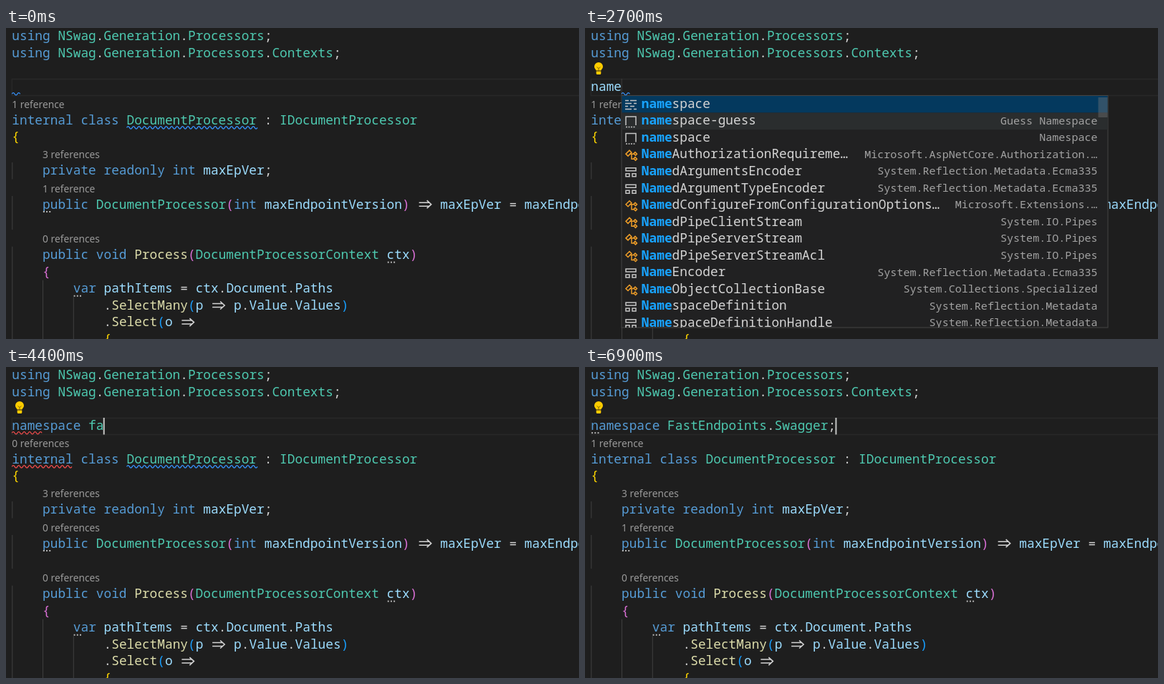
Write an HTML page that moves like this. It is 800x435 px and loops after 7.1 s.

```html
<!DOCTYPE html>
<html lang="en">
<head>
<meta charset="utf-8">
<title>Namespace completion</title>
<style>
  html, body { margin: 0; width: 100%; height: 100%; overflow: hidden; background: #1e1e1e; }
  svg { display: block; width: 800px; height: 435px; }
  text { white-space: pre; font: 500 17.81px "Noto Sans Mono", "DejaVu Sans Mono", monospace; fill: #d4d4d4; font-variant-ligatures: none; }
  .lens { font: 13.8px "Noto Sans", "Open Sans", sans-serif; fill: #999; }
  .detail { font-size: 15.07px; fill: #a3a3a3; text-anchor: end; }
  .match { font-weight: bold; fill: #18a3ff; }
</style>
</head>
<body>
<svg id="stage" viewBox="0 0 800 435"></svg>
<script>
const LOOP = 7100, LEFT = 8.3, CHAR = 10.686, ROW = 23.55;
const colors = {
  k: '#569cd6', t: '#4ec9b0', v: '#9cdcfe', m: '#dcdcaa', p: '#d4d4d4',
  gold: '#ffd700', orchid: '#da70d6', blue: '#179fff'
};
const stage = document.getElementById('stage');
const colX = col => LEFT + col * CHAR;
const baseline = row => 17 + row * ROW;

function add(tag, attrs = {}, parent = stage, content = '') {
  const node = document.createElementNS('http://www.w3.org/2000/svg', tag);
  for (const name in attrs) node.setAttribute(name, attrs[name]);
  node.textContent = content;
  return parent.appendChild(node);
}
const show = (node, on) => { node.style.display = on ? '' : 'none'; };

// Fills a text node from alternating colour keys and strings; punctuation stays plain.
function fillTokens(node, tokens) {
  node.textContent = '';
  for (let i = 0; i < tokens.length; i += 2)
    for (const part of tokens[i + 1].split(/([.;:=])/))
      if (part) add('tspan', { fill: colors[/^[.;:=]$/.test(part) ? 'p' : tokens[i]] }, node, part);
}
function code(row, col, ...tokens) {
  const node = add('text', { x: colX(col), y: baseline(row) });
  fillTokens(node, tokens);
  return node;
}
const lens = (row, col, label) =>
  add('text', { class: 'lens', x: colX(col), y: baseline(row) + .6 }, stage, label);

function arrow(row, col) {
  const x = colX(col), y = baseline(row) - 5.8;
  add('path', {
    d: `M${x + 2} ${y - 2.5}h14M${x + 2} ${y + 2.5}h14M${x + 13} ${y - 5.5}l6 5.5l-6 5.5`,
    fill: 'none', stroke: colors.p, 'stroke-width': 1.6
  });
}
function guide(col, fromRow, toRow) {
  const y = baseline(fromRow) - 17.5;
  add('rect', { x: colX(col), y, width: 1, height: (toRow - fromRow + 1) * ROW, fill: '#404040' });
}
function wave(row, col, chars, color) {
  const x = colX(col), y = baseline(row) + 4.6, half = 3.8;
  const turns = Math.round(chars * CHAR / half);
  let d = `M${x} ${y}q${half / 2} -3.4 ${half} 0`;
  for (let i = 1; i < turns; i++) d += `t${half} 0`;
  return add('path', { d, fill: 'none', stroke: color, 'stroke-width': 1.3 });
}
function dots(row, col) {
  const g = add('g', { fill: '#b5b5b5' });
  for (let i = 0; i < 3; i++)
    add('rect', { x: colX(col) + .8 + i * 4.2, y: baseline(row) + 3.5, width: 2, height: 2 }, g);
  return g;
}

add('rect', { width: 800, height: 435, fill: '#1e1e1e' });
add('rect', { x: LEFT, y: 71.5, width: 800, height: 23, fill: 'none', stroke: '#282828', 'stroke-width': 1.5 });

guide(0, 8, 8); guide(0, 10, 11); guide(0, 13, 18);
guide(4, 15, 18); guide(8, 16, 18);

code(0, 0, 'k', 'using ', 't', 'NSwag.Generation.Processors;');
code(1, 0, 'k', 'using ', 't', 'NSwag.Generation.Processors.Contexts;');
const typed = code(3, 0);
const classLens = lens(4, 0, '');
code(5, 0, 'k', 'internal class ', 't', 'DocumentProcessor : IDocumentProcessor');
code(6, 0, 'gold', '{');
lens(7, 4, '3 references');
code(8, 4, 'k', 'private readonly int ', 'v', 'maxEpVer;');
const ctorLens = lens(9, 4, '');
code(10, 4, 'k', 'public ', 't', 'DocumentProcessor', 'orchid', '(', 'k', 'int ',
  'v', 'maxEndpointVersion', 'orchid', ')', 'v', '    maxEpVer = maxEndpointVersion;');
arrow(10, 53);
lens(12, 4, '0 references');
code(13, 4, 'k', 'public void ', 'm', 'Process', 'orchid', '(', 't', 'DocumentProcessorContext ',
  'v', 'ctx', 'orchid', ')');
code(14, 4, 'orchid', '{');
code(15, 8, 'k', 'var ', 'v', 'pathItems = ctx.Document.Paths');
code(16, 12, 'm', '.SelectMany', 'blue', '(', 'v', 'p    p.Value.Values', 'blue', ')');
arrow(16, 26);
code(17, 12, 'm', '.Select', 'blue', '(', 'v', 'o');
arrow(17, 22);
code(18, 12, 'gold', '{');

dots(10, 4); dots(13, 49); dots(15, 8);
const nameDots = dots(3, 10), keywordDots = dots(3, 0);
const classWave = wave(5, 15, 17, '#3794ff');
const endWave = wave(3, 0, 1, '#3794ff');
const errorWaves = [wave(3, 0, 4, '#f14c4c'), wave(5, 0, 8, '#f14c4c')];
const missingWave = wave(3, 31, 1, '#f14c4c');

const bulb = add('g', { fill: '#ffcc00' });
add('path', { d: 'M13 54a6 6 0 1 1 12 0c0 2.5-2 3.5-2.7 5.5h-6.6c-.7-2-2.7-3-2.7-5.5z' }, bulb);
add('path', { d: 'M15.7 60.5h6.6v3q0 1.5-1.5 1.5h-3.6q-1.5 0-1.5-1.5z' }, bulb);
add('path', { d: 'M16.5 54.5l2.5 2l2.5-2M19 56.5v4', fill: 'none', stroke: '#7a6200', 'stroke-width': .9 }, bulb);

const cursor = add('rect', { y: 71, width: 2, height: 23.5, fill: '#c4c5c3' });

const icons = {
  keyword: ['#c5c5c5', 'M0 2h5M7 2h9M0 6h9M12 6h4M0 10h4M7 10h6M0 14h9M12 14h4'],
  snippet: ['#c5c5c5', 'M1 13V1h14v12M1 15.5h2M4.5 15.5h2M8 15.5h2M11.5 15.5h2'],
  module: ['#c5c5c5', 'M6 2q-3 0-3 3v1q0 2-2 2q2 0 2 2v1q0 3 3 3M10 2q3 0 3 3v1q0 2 2 2q-2 0-2 2v1q0 3-3 3'],
  cls: ['#ee9d28', 'M1 6l5-5l3 3l-5 5zM6 6h6M9 6v7h3M12 5.5l2-2l2.5 2.5l-2 2zM12 12.5l2-2l2.5 2.5l-2 2z'],
  struct: ['#c5c5c5', 'M1 2h14v4h-14zM1 10h5v4h-5zM10 10h5v4h-5z']
};
const ecma = 'System.Reflection.Metadata.Ecma335', pipes = 'System.IO.Pipes', metadata = 'System.Reflection.Metadata';
const items = [
  ['keyword', 'nameof'],
  ['keyword', 'namespace'],
  ['snippet', 'namespace-guess', 'Guess Namespace'],
  ['snippet', 'namespace', 'Namespace'],
  ['module', 'Namotion'],
  ['cls', 'NameAuthorizationRequireme…', 'Microsoft.AspNetCore.Authorization.…'],
  ['struct', 'NamedArgumentsEncoder', ecma],
  ['struct', 'NamedArgumentTypeEncoder', ecma],
  ['cls', 'NamedConfigureFromConfigurationOptions…', 'Microsoft.Extensions.…'],
  ['cls', 'NamedPipeClientStream', pipes],
  ['cls', 'NamedPipeServerStream', pipes],
  ['cls', 'NamedPipeServerStreamAcl', pipes],
  ['struct', 'NameEncoder', ecma],
  ['cls', 'NameObjectCollectionBase', 'System.Collections.Specialized'],
  ['struct', 'NamespaceDefinition', metadata],
  ['struct', 'NamespaceDefinitionHandle', metadata]
];

const clip = add('clipPath', { id: 'list' });
add('rect', { width: 680, height: 324 }, clip);

function popup(list, matched, hovered) {
  const g = add('g', { transform: `translate(${colX(matched) - .5} 95)` });
  add('rect', { x: .5, y: -.5, width: 679, height: 324.5, fill: '#212122', stroke: '#454545' }, g);
  const body = add('g', { 'clip-path': 'url(#list)' }, g);
  add('rect', { x: 1, width: 678, height: ROW, fill: '#04395e' }, body);
  if (hovered) add('rect', { x: 1, y: hovered * ROW, width: 678, height: ROW, fill: '#2a2d2e' }, body);
  list.slice(0, 14).forEach(([kind, label, detail = ''], i) => {
    const y = i * ROW, [stroke, d] = icons[kind];
    add('path', { d, fill: 'none', stroke, 'stroke-width': 1.5, transform: `translate(5.5 ${y + 4.5})` }, body);
    const name = add('text', { x: 28.3, y: y + 16.8 }, body);
    add('tspan', { class: 'match' }, name, label.slice(0, matched));
    add('tspan', {}, name, label.slice(matched));
    add('text', { class: 'detail', x: 665, y: y + 16 }, body, detail);
  });
  add('rect', { x: 666, y: hovered ? 2 : 0, width: 13, height: hovered ? 28 : 24, fill: '#797979', opacity: hovered ? .4 : .2 }, body);
  return g;
}
const firstList = popup(items, 3, 0);
const secondList = popup(items.filter(([, label]) => label !== 'nameof' && /^name/i.test(label)), 4, 1);

// Each edit: time, then the tokens on the edited line.
const full = 'FastEndpoints.Swagger';
const edits = [
  [-1000],
  [1690, 'v', 'n'],
  [1770, 'v', 'na'],
  [1845, 'v', 'nam'],
  [1920, 'v', 'name'],
  [2880, 'k', 'namespace'],
  [3480, 'k', 'namespace '],
  [3990, 'k', 'namespace ', 't', 'f'],
  [4190, 'k', 'namespace ', 't', 'fa'],
  [4890, 'k', 'namespace ', 'p', full],
  [5450, 'k', 'namespace ', 't', full + ';']
].map(([time, ...tokens]) => ({
  time, tokens, length: tokens.filter((_, i) => i % 2).join('').length
}));

const within = (t, from, to) => t >= from && t < to;
const references = one => one ? '1 reference' : '0 references';
const clamp = x => Math.max(0, Math.min(1, x));
let current = null;

function blink(sinceEdit) {
  if (sinceEdit < 500) return 1;
  const phase = (sinceEdit - 500) % 1000;
  return clamp((300 - Math.min(phase, 1000 - phase)) / 200);
}

function render(t) {
  const index = edits.findLastIndex(edit => edit.time <= t);
  const edit = edits[index], before = edits[Math.max(0, index - 1)];
  if (edit !== current) {
    fillTokens(typed, edit.tokens);
    current = edit;
  }
  const glide = clamp((t - edit.time) / 80);
  cursor.setAttribute('x', colX(before.length + (edit.length - before.length) * glide) - .8);
  cursor.setAttribute('opacity', blink(t - edit.time));

  show(firstList, within(t, 1850, 1960));
  show(secondList, within(t, 1960, 2880));
  show(bulb, within(t, 2500, 2900) || within(t, 3300, 3480) || within(t, 4300, 5450) || t >= 5700);

  endWave.setAttribute('transform', `translate(${edit.length * CHAR} 0)`);
  show(endWave, t < 2880);
  show(classWave, t < 4600);
  errorWaves.forEach(node => show(node, within(t, 3700, 4600)));
  show(missingWave, within(t, 4890, 5600));
  show(nameDots, within(t, 4890, 6100));
  show(keywordDots, t >= 6100);

  classLens.textContent = references(t < 3800 || t >= 6100);
  ctorLens.textContent = references(t < 3800 || t >= 5800);
}

const start = performance.now();
function tick() {
  render((performance.now() - start) % LOOP);
  requestAnimationFrame(tick);
}
tick();
</script>
</body>
</html>
```
